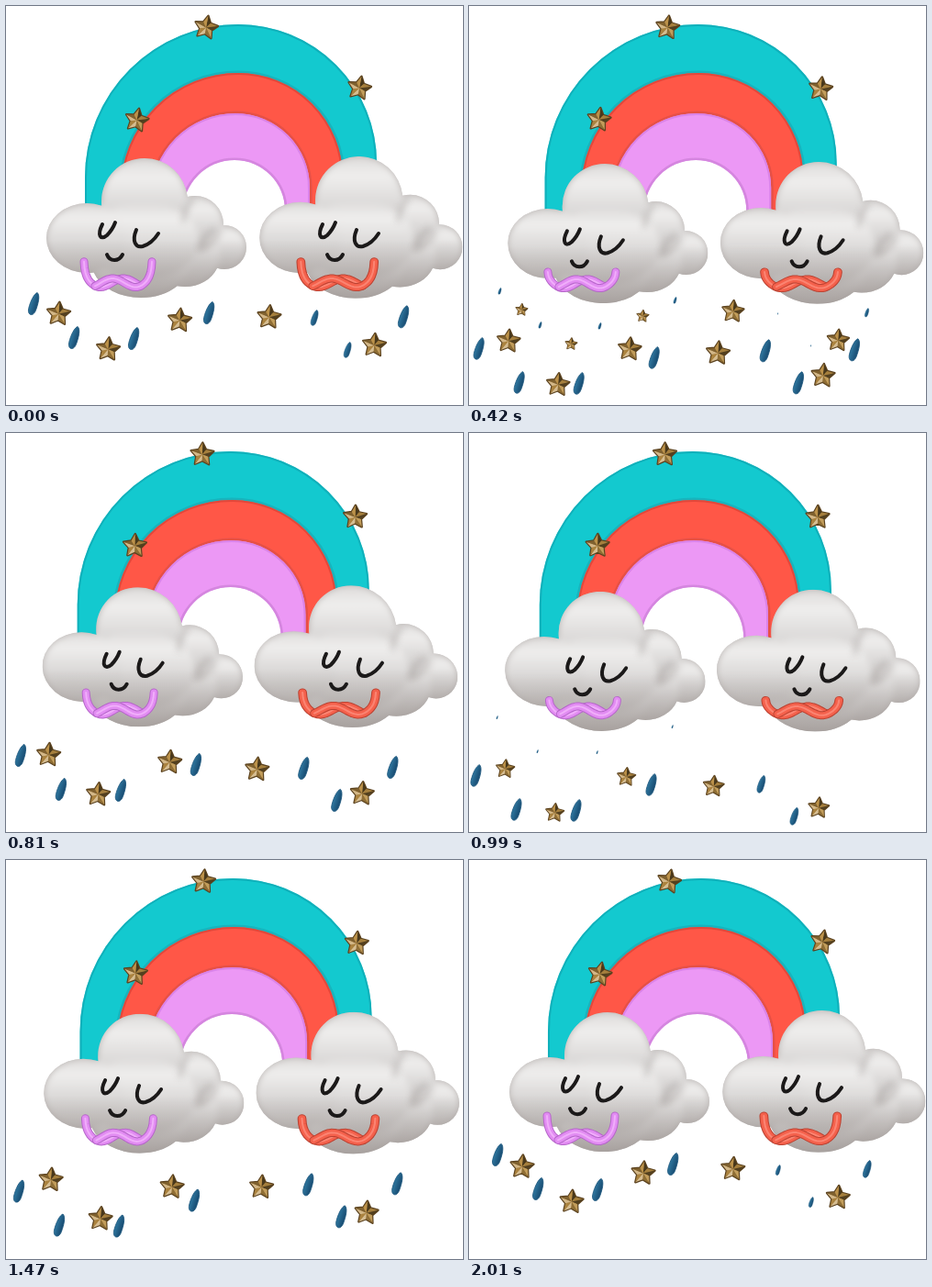
Recreate the animation shown at these times as an HTML page. Size 498x435 px, loop 2040 ms.

```html
<!DOCTYPE html>
<html lang="en">
<head>
<meta charset="utf-8">
<title>Rainbow clouds</title>
<style>
  html, body { margin: 0; width: 100%; height: 100%; overflow: hidden; background: #fff; }
  svg { display: block; width: 498px; height: 435px; }
</style>
</head>
<body>
<svg id="stage" viewBox="0 0 498 435" xmlns="http://www.w3.org/2000/svg">
  <defs>
    <filter id="soft" x="-30%" y="-30%" width="160%" height="160%"><feGaussianBlur stdDeviation="3.5"/></filter>
    <linearGradient id="dropFill"><stop offset="0" stop-color="#2f779f"/><stop offset="1" stop-color="#174a70"/></linearGradient>
    <linearGradient id="puff" x2="0" y2="1">
      <stop offset="0" stop-color="#dddbda"/><stop offset=".22" stop-color="#efeeed"/>
      <stop offset=".55" stop-color="#dbd9d8"/><stop offset="1" stop-color="#c3bfbd"/>
    </linearGradient>
    <linearGradient id="shade" x2="0" y2="1">
      <stop offset=".62" stop-color="#968e8b" stop-opacity="0"/><stop offset="1" stop-color="#968e8b" stop-opacity=".6"/>
    </linearGradient>
    <clipPath id="cloudClip"></clipPath>
  </defs>
</svg>
<script>
const LOOP = 2040, BOB = LOOP / 3, TAU = Math.PI * 2;
const stage = document.getElementById('stage');

function add(parent, tag, attrs = {}) {
  const node = document.createElementNS('http://www.w3.org/2000/svg', tag);
  for (const key in attrs) node.setAttribute(key, attrs[key]);
  return parent.appendChild(node);
}
const move = (node, value) => node.setAttribute('transform', value);
const clamp = v => Math.max(0, Math.min(1, v));

// Rainbow: each arch is two quarter circles that meet at its apex
function arch({ apex, top, left, right }, inset) {
  const l = left - inset, r = right - inset, y = top + inset;
  return `M${apex - l} 262V${y + l}A${l} ${l} 0 0 1 ${apex} ${y}A${r} ${r} 0 0 1 ${apex + r} ${y + r}V262`;
}
const bands = [
  { apex: 253, top: 20, left: 167, right: 151, drift: 4.6, fill: '#13c9cf', edge: '#0fabb6' },
  { apex: 253, top: 73, left: 128, right: 114, drift: 3.7, fill: '#ff5747', edge: '#dd4437' },
  { apex: 250, top: 117, left: 92, right: 81, drift: 2.5, fill: '#ec98f5', edge: '#d67fe6' },
  { apex: 249, top: 168, left: 56, right: 55, drift: 2.4, fill: '#fff', edge: '#d585e2' }
];
bands.forEach((band, i) => {
  const line = { fill: 'none', stroke: band.edge, 'stroke-width': 2, opacity: .8 };
  const inset = band.fill === '#fff' ? -1 : 1;
  band.node = add(stage, 'g');
  if (i) add(band.node, 'path', { ...line, d: arch(band, 0), stroke: '#402040', 'stroke-width': 5, opacity: .13 });
  add(band.node, 'path', { d: arch(band, 0), fill: band.fill });
  add(band.node, 'path', { ...line, d: arch(band, inset) });
});

// Gold star: ten facets lit from one side
function star(parent) {
  const outer = add(parent, 'g'), g = add(outer, 'g', { transform: 'rotate(5)' });
  const rim = i => {
    const a = i * TAU / 10 - TAU / 4, r = i % 2 ? 6.8 : 13;
    return `${(r * Math.cos(a)).toFixed(1)} ${(r * Math.sin(a)).toFixed(1)}`;
  };
  const outline = Array.from({ length: 10 }, (_, i) => rim(i)).join('L');
  add(g, 'path', { d: `M${outline}Z`, fill: '#a37c40', stroke: '#5b421f', 'stroke-width': 2.4, 'stroke-linejoin': 'round' });
  for (let i = 0; i < 10; i++) {
    const light = 45 + 14 * Math.cos(i * TAU / 10 - 3.6) + (i % 2 ? 13 : -13);
    add(g, 'path', { d: `M0 0L${rim(i)}L${rim(i + 1)}Z`, fill: `hsl(38 46% ${light}%)` });
  }
  return outer;
}

function drop(parent) {
  const g = add(parent, 'g');
  add(g, 'path', {
    d: 'M0 -13C4 -11 4.5 -2 4 6C3.5 14 -3.5 14 -4 6C-4.5 -2 -3 -11 0 -13Z',
    transform: 'rotate(17)', fill: 'url(#dropFill)', stroke: '#1d577e', 'stroke-width': .8
  });
  return g;
}

// Clouds: shaded lobes blurred together inside a crisp outline
const lobes = [
  [238, 263, 24, 24], [195, 273, 38, 33], [206, 238, 31, 31], [147, 278, 54, 40],
  [151, 213, 47, 47], [150, 256, 60, 42], [88, 253, 44, 38]
];
function addLobes(parent, attrs) {
  for (const [cx, cy, rx, ry] of lobes) add(parent, 'ellipse', { cx, cy, rx, ry, ...attrs });
}
addLobes(document.getElementById('cloudClip'));

const FACE = 'M105 238C99 250 103 256 110 250Q116 244 119 236' +
  'M142 244C137 256 141 264 149 262Q159 259 166 248M110 271C113 279 123 279 127 271';

function makeCloud(place, faceX) {
  const body = add(stage, 'g');
  const shape = add(add(body, 'g', { transform: place }), 'g', { 'clip-path': 'url(#cloudClip)' });
  const area = { x: 30, y: 150, width: 250, height: 170 };
  add(shape, 'rect', { ...area, fill: '#b9b4b2' });
  addLobes(add(shape, 'g', { filter: 'url(#soft)' }), { fill: 'url(#puff)' });
  add(shape, 'path', {
    d: 'M193 236Q196 217 204 210M212 264Q214 250 228 243', fill: 'none', stroke: '#a39d9b',
    'stroke-width': 5, opacity: .45, filter: 'url(#soft)'
  });
  add(shape, 'rect', { ...area, fill: 'url(#shade)' });
  const face = add(stage, 'g');
  add(face, 'path', {
    d: FACE, transform: `translate(${faceX} 0)`, fill: 'none', stroke: '#1b1919',
    'stroke-width': 4, 'stroke-linecap': 'round', 'stroke-linejoin': 'round'
  });
  return { body, face };
}
const clouds = [
  { ...makeCloud('', 0), drift: 1.9, turn: 2.6 },
  { ...makeCloud('translate(231.5 -5) scale(1.015 1.018)', 240), drift: 2.6, turn: 2.2 }
];

// Arms: two mirrored wavy strands whose far ends lift
function makeArms(...coats) {
  const g = add(stage, 'g', { fill: 'none', 'stroke-linecap': 'round', 'stroke-linejoin': 'round' });
  const strands = [1, -1].map(side => ({
    side, coats: coats.map((stroke, i) => add(g, 'path', { stroke, 'stroke-width': [9, 7, 2][i] }))
  }));
  return { g, strands };
}
const arms = [makeArms('#b566c9', '#e28cf2', '#f0aefa'), makeArms('#bb4232', '#f4614c', '#fb8472')];

function strandPath(side, stretch) {
  const points = [];
  for (let u = 0; u <= 1.001; u += .04) {
    const x = 85 + 62 * Math.pow(u, 1.5);
    const lift = (21 - 12 * stretch) * Math.exp(-9 * u);
    const y = 302 + stretch - lift - 5 * Math.cos((x - 128) / 52 * TAU);
    points.push(`${(122 + side * (x - 122)).toFixed(1)} ${y.toFixed(1)}`);
  }
  return 'M' + points.join('L');
}

// Showers: every group falls three times per loop, drifting left as it sinks
const showers = [
  { make: drop, x: 35, y: 312, from: 309.5, to: 380, slope: .36, sway: 2.5, ease: 1.15, grow: 70, spread: 0,
    starts: [-170, 400, 980], life: 640, items: [[0, 0], [44, 37], [109, 38], [191, 10]] },
  { make: drop, x: 338, y: 335, from: 335, to: 387, slope: .33, sway: 1.8, ease: 1.2, grow: 130, spread: 0,
    starts: [-90, 410, 1200], life: 620, items: [[0, 0], [36, 35], [97, -1, 40]] },
  { make: star, x: 58, y: 334, from: 331, to: 370, slope: .42, sway: 2.5, ease: 1.6, grow: 60, spread: .008,
    starts: [-170, 390, 1080], life: 640, items: [[0, 0], [54, 38], [132, 7]] },
  { make: star, x: 287.5, y: 337, from: 330, to: 390, slope: .36, sway: 1.8, ease: 1.2, grow: 60, spread: -.005,
    starts: [-140, 365, 1130], life: 670, items: [[0, 0], [114.5, 31]] }
];
for (const s of showers)
  s.bits = s.starts.flatMap(start => s.items.map(([dx, dy, early = 0]) =>
    ({ start, dx, dy, early, node: s.make(stage) })));

const pins = [[218, 23.5, 2.3, 0], [385, 89.5, 2.5, -1.2], [142.5, 124.5, 1.2, .8]]
  .map(([x, y, dx, dy]) => ({ x, y, dx, dy, node: star(stage) }));

function updateShower(s, t, swing) {
  for (const { start, dx, dy, early, node } of s.bits) {
    const age = (t - start + LOOP) % LOOP;
    const shown = age + early;
    const size = clamp(Math.min(shown / s.grow, (s.life - shown) / 50));
    node.style.display = size > 0 ? '' : 'none';
    const sunk = s.from + (s.to - s.from) * Math.pow(clamp(age / s.life), s.ease) - s.y;
    const x = s.x + dx - s.slope * sunk - s.sway * swing;
    const y = s.y + dy + sunk * (1 + dy * s.spread);
    move(node, `translate(${x} ${y}) scale(${size})`);
  }
}

function render(t) {
  const swing = 1 - Math.cos(TAU * t / LOOP);
  const bob = (1 - Math.cos(TAU * t / BOB)) / 2;
  for (const b of bands) move(b.node, `translate(${-b.drift * swing} 0)`);
  for (const p of pins)
    move(p.node, `translate(${p.x - p.dx * swing} ${p.y - p.dy * swing}) rotate(${6 - 5 * swing})`);
  for (const c of clouds) {
    move(c.body, `translate(${-c.drift * swing} ${7 * bob + 280}) skewX(${1.1 * swing}) translate(0 -280)`);
    move(c.face, `translate(${c.turn * swing} ${8.4 * bob})`);
  }
  for (const { strands } of arms)
    for (const { side, coats } of strands) {
      const d = strandPath(side, bob);
      coats.forEach(node => node.setAttribute('d', d));
    }
  move(arms[0].g, `translate(${1.2 * swing} 0)`);
  move(arms[1].g, `translate(${229.5 + swing} 0) scale(1.08 1)`);
  for (const s of showers) updateShower(s, t, swing);
}

const begin = performance.now();
function tick() {
  render((performance.now() - begin) % LOOP);
  requestAnimationFrame(tick);
}
tick();
</script>
</body>
</html>
```
